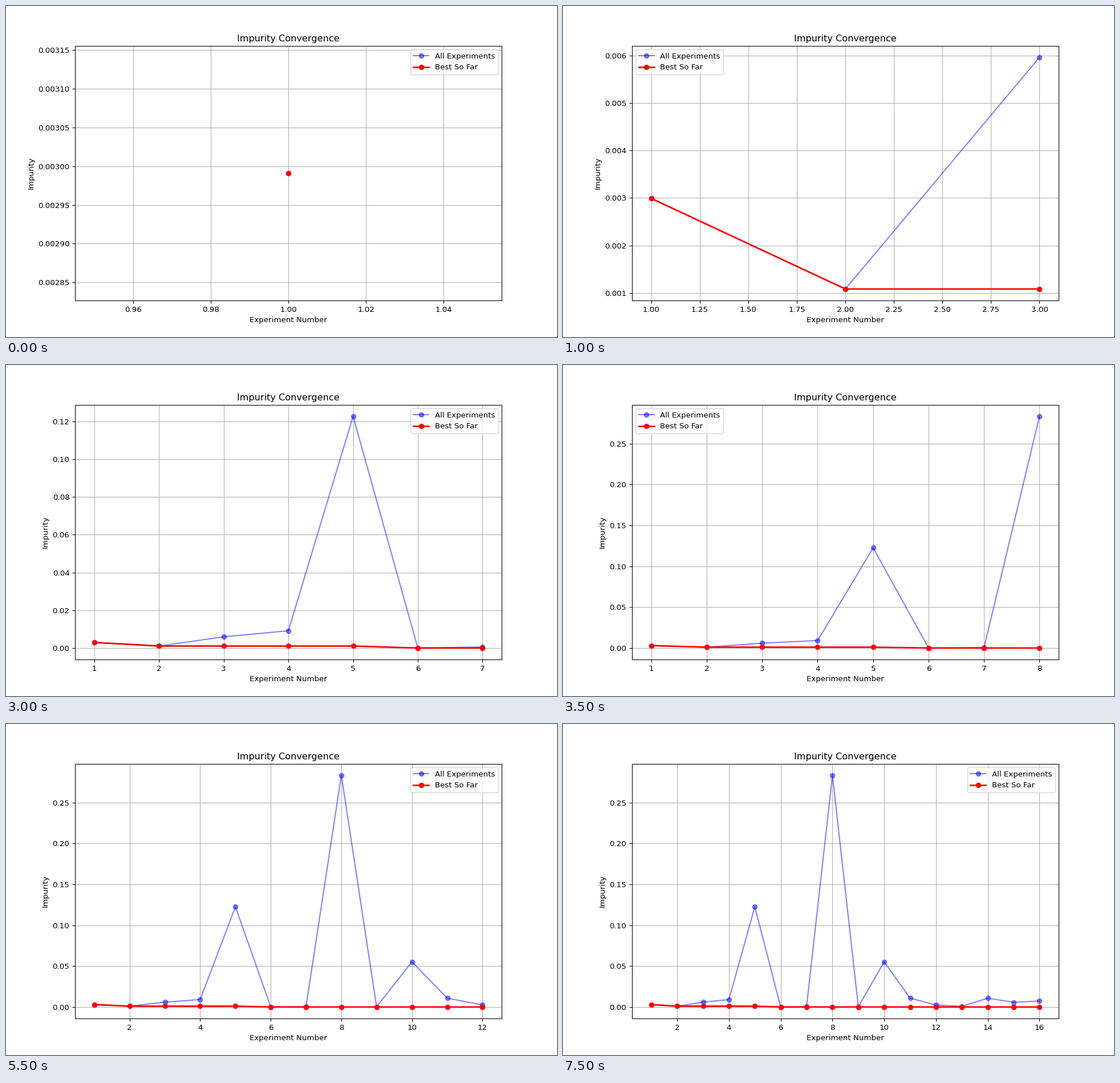
These frames come from a looping animation (966x580 px, 8 s). A matplotlib script:

```python
import matplotlib.pyplot as plt
import numpy as np
from matplotlib.animation import FuncAnimation

WIDTH, HEIGHT = 966, 580
DPI = WIDTH / 10
STEP_MS = 500
TRIALS = 16

# Batches of experiments: first trial, its impurity, resting level, ratio per step
BATCHES = [
    (1, 0.002991, 0, 0),
    (2, 0.001084, 0.01535, 0.658),
    (5, 0.1226, 0.0006, -0.0045),
    (8, 0.2833, 0.0003, 0),
    (10, 0.0553, 0.0005, 0.19),
    (14, 0.0108, 0.007, -0.3),
]


def measure(n):
    """Impurity of trial n, relaxing geometrically within its batch."""
    start, first, rest, ratio = max(b for b in BATCHES if b[0] <= n)
    return rest + (first - rest) * ratio ** (n - start)


trials = np.arange(1, TRIALS + 1)
impurity = np.array([measure(int(n)) for n in trials])
best = np.minimum.accumulate(impurity)

# The small surplus keeps the pixel size from being floored one short
fig, ax = plt.subplots(
    figsize=((WIDTH + 0.01) / DPI, (HEIGHT + 0.01) / DPI), dpi=DPI)


def update(i):
    """Redraw the chart with the first i + 1 experiments."""
    n = i + 1
    ax.clear()
    ax.plot(trials[:n], impurity[:n], "bo-", alpha=0.5, label="All Experiments")
    ax.plot(trials[:n], best[:n], "ro-", linewidth=2, label="Best So Far")
    ax.set_title("Impurity Convergence")
    ax.set_xlabel("Experiment Number")
    ax.set_ylabel("Impurity")
    ax.grid(True)
    ax.legend()


anim = FuncAnimation(fig, update, frames=TRIALS, interval=STEP_MS,
                     repeat=True, repeat_delay=0)
plt.show()
```
